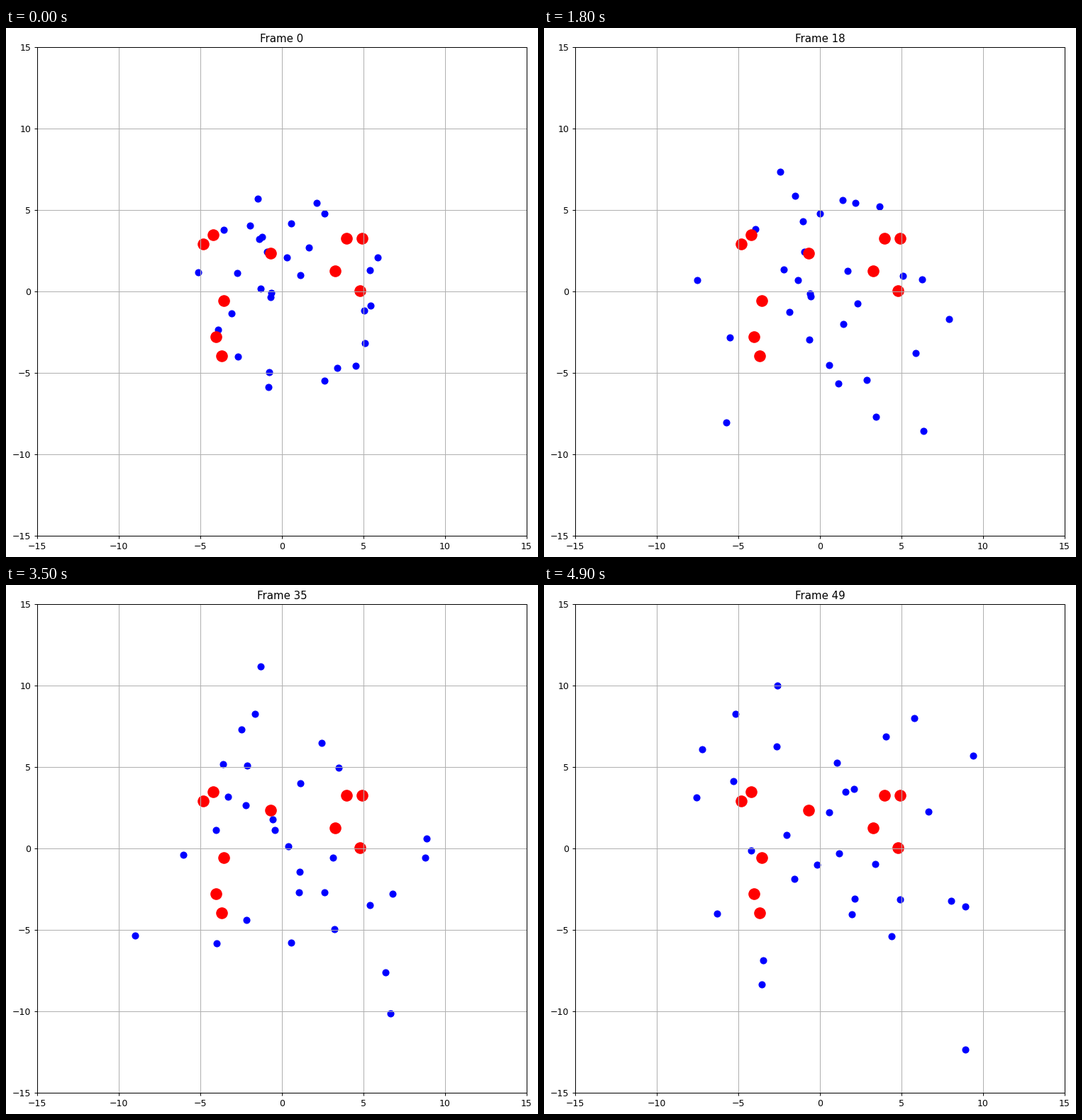
Animation of 750x747 px, one loop 5 s. Source, as a matplotlib script:

```python
import numpy as np
import matplotlib.pyplot as plt
from matplotlib.animation import FuncAnimation

WIDTH, HEIGHT, DPI = 750, 747, 90
LEFT, BOTTOM, SIDE = 44, 30, 690
FRAMES, INTERVAL = 50, 100
LIMIT = 15

PARTICLES = 30
SPAWN = 6       # half side of the square where particles start
MAX_STEP = 1    # largest move per frame along each axis

OBSTACLES = np.array([
    (-4.83, 2.93), (-4.20, 3.46), (-.70, 2.34), (3.95, 3.28), (4.92, 3.28),
    (3.28, 1.25), (4.80, .05), (-3.57, -.57), (-4.04, -2.80), (-3.69, -3.97),
])


def random_walks(seed=7):
    """Positions of all particles, indexed by frame, particle and axis."""
    rng = np.random.default_rng(seed)
    moves = rng.uniform(-MAX_STEP, MAX_STEP, (FRAMES, PARTICLES, 2))
    moves[0] = rng.uniform(-SPAWN, SPAWN, (PARTICLES, 2))
    return moves.cumsum(axis=0)


walks = random_walks()

plt.rcParams["font.family"] = "DejaVu Sans"
fig = plt.figure(figsize=(WIDTH / DPI, HEIGHT / DPI), dpi=DPI, facecolor="white")
ax = fig.add_axes([LEFT / WIDTH, BOTTOM / HEIGHT, SIDE / WIDTH, SIDE / HEIGHT])
ax.set(xlim=(-LIMIT, LIMIT), ylim=(-LIMIT, LIMIT))
ax.grid(True)
particles = ax.scatter(*walks[0].T, c="blue", s=50)
ax.scatter(*OBSTACLES.T, c="red", s=150)
title = ax.set_title("Frame 0")


def update(frame):
    particles.set_offsets(walks[frame])
    title.set_text(f"Frame {frame}")
    return particles, title


animation = FuncAnimation(fig, update, frames=FRAMES, interval=INTERVAL, repeat=True)
plt.show()
```
